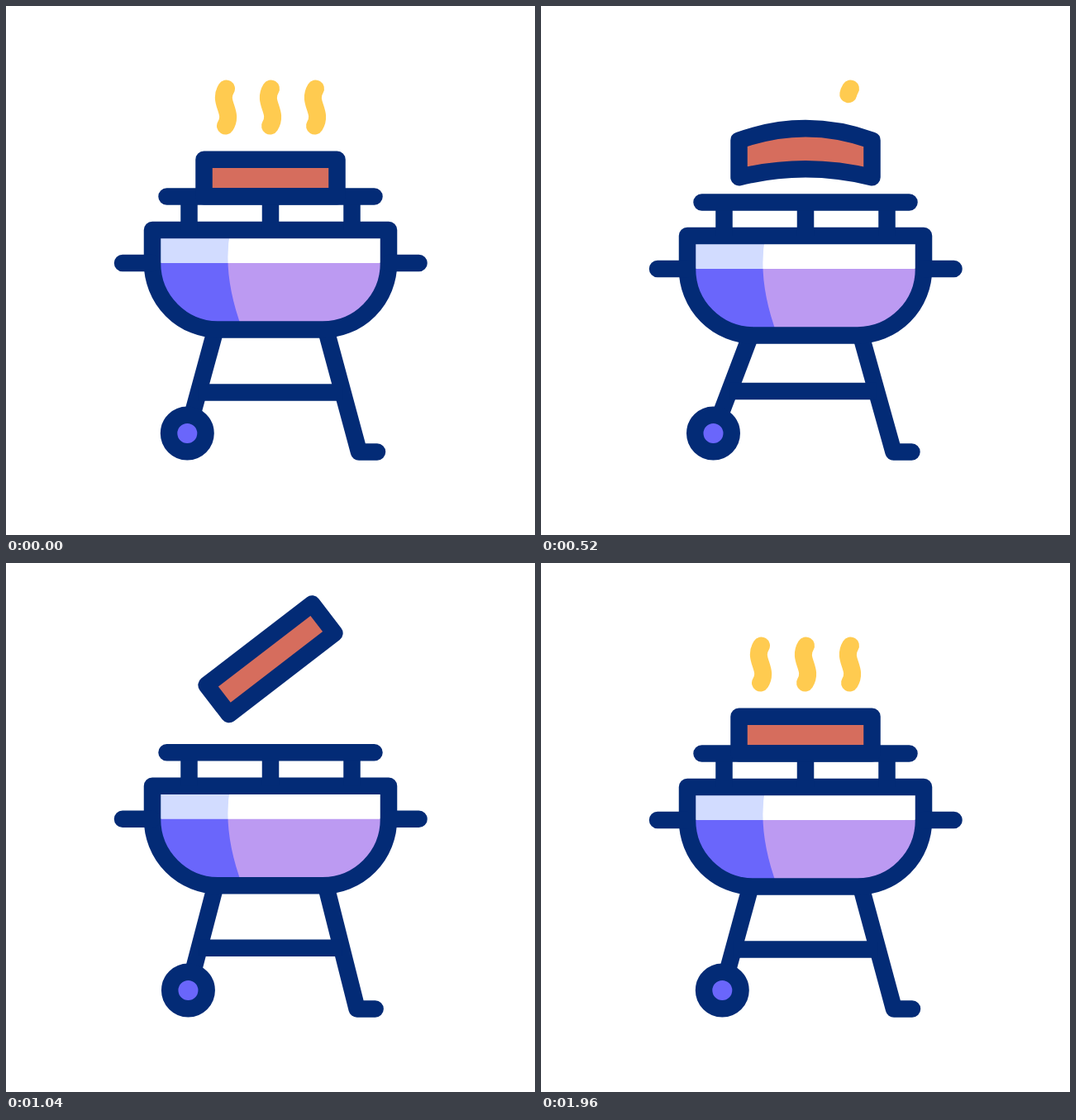
Recreate the animation shown at these times as an HTML page. Size 640 by 640 pixels, loop 2.16 s.

```html
<!DOCTYPE html>
<html lang="en">
<head>
<meta charset="utf-8">
<title>Grill</title>
<style>
  html, body { margin: 0; width: 100%; height: 100%; overflow: hidden; background: #fff; }
  svg { display: block; width: 100%; height: 100%; }
  .line { fill: none; stroke: #032b76; stroke-width: 20.5; stroke-linejoin: round; }
  .round { stroke-linecap: round; }
  #smoke { fill: none; stroke: #ffcb50; stroke-width: 21; stroke-linecap: round; }
</style>
</head>
<body>
<svg viewBox="0 0 640 640">
  <defs>
    <path id="bowl" d="M177 271H463V311A80 80.5 0 0 1 383 391.5H257A80 80.5 0 0 1 177 311Z"/>
    <clipPath id="inside"><use href="#bowl"/></clipPath>
  </defs>
  <g id="smoke"></g>
  <path id="legs" class="line round"/>
  <path id="bar" class="line"/>
  <circle id="wheel" class="line" cy="517" r="22.25" style="fill:#6a66fb"/>
  <g id="body">
    <g clip-path="url(#inside)">
      <path fill="#fff" d="M170 265H470V311H170Z"/>
      <path fill="#bc9af2" d="M170 311H470V400H170Z"/>
      <clipPath id="shade"><path d="M170 271H271.5Q261 325 286 391.5H170Z"/></clipPath>
      <g clip-path="url(#shade)">
        <path fill="#d2dcff" d="M170 265H300V311H170Z"/>
        <path fill="#6a66fb" d="M170 311H300V400H170Z"/>
      </g>
    </g>
    <use href="#bowl" class="line"/>
    <path class="line" d="M221.5 231V271M320 231V271M418.5 231V271"/>
    <path class="line round" d="M194.5 230.5H445.5M141 311H177M463 311H499.5"/>
  </g>
  <path id="meat" class="line" style="fill:#d66d5d"/>
</svg>
<script>
const $ = id => document.getElementById(id);
const set = (el, attrs) => { for (const k in attrs) el.setAttribute(k, attrs[k]); };
const part = (t, from, to) => Math.min(1, Math.max(0, (t - from) / (to - from)));
const smooth = u => u * u * (3 - 2 * u);
const mix = (a, b, u) => a + (b - a) * u;

// Eased value at t through [time, value] pairs
function keys(t, ...pairs) {
  let v = pairs[0][1];
  for (let i = 1; i < pairs.length; i++)
    v = mix(v, pairs[i][1], smooth(part(t, pairs[i - 1][0], pairs[i][0])));
  return v;
}

const wisps = [0, 1, 2].map(i => {
  const p = document.createElementNS("http://www.w3.org/2000/svg", "path");
  set(p, { d: "M266.5 100C256 117 276 128 265.5 145", pathLength: 1, transform: `translate(${54 * i})` });
  return $("smoke").appendChild(p);
});

function drawSmoke(t) {
  wisps.forEach((p, i) => {
    const gone = smooth(part(t, 60 + 110 * i, 380 + 110 * i));
    const grown = 1 - (1 - part(t, 1315 + 115 * i, 1755 + 115 * i)) ** 3;
    const size = t < 1000 ? 1 - gone : grown;
    set(p, {
      "stroke-dasharray": `${size} 3`,
      "stroke-dashoffset": t < 1000 ? 0 : size - 1,
      visibility: size > 0 ? "visible" : "hidden"
    });
  });
}

function drawStand(t, dy) {
  const top = 391.5 + dy;
  const wheelX = 219.3 + keys(t, [0, 0], [385, -16.8], [800, 7.3], [1120, 0]);
  const footX = 427 + keys(t, [0, 0], [320, 8.3], [800, -15.2], [1120, 0]);
  const barY = 467.5 + keys(t, [0, 0], [320, 4.7], [800, -11.5], [1120, 0]);
  const left = mix(253.5, wheelX, part(barY, top, 517));
  const right = mix(387, footX, part(barY, top, 539.5));
  set($("legs"), { d: `M253.5 ${top}L${wheelX} 517M387 ${top}L${footX} 539.5h22` });
  set($("legs"), { d: `M253.5 ${top}L${mix(253.5, wheelX, .8)} ${mix(top, 517, .8)}M387 ${top}L${footX} 539.5h22` });
  set($("bar"), { d: `M${left} ${barY}H${right}` });
  set($("wheel"), { cx: wheelX });
}

function drawMeat(t, dy) {
  let rise = -dy;
  if (t > 840) rise = 101.5 * (1 - part(t, 840, 1485) ** 2);
  else if (t > 455) rise = mix(-12, 101.5, 1 - (1 - part(t, 455, 840)) ** 2);
  const turn = 180 * smooth(part(t, 560, 1240));
  const bend = keys(t, [455, 0], [520, 14.5], [720, 0], [1160, 0], [1290, 8], [1480, 0]);
  const low = Math.min(bend, 10);
  set($("meat"), {
    d: `M-80.5 -22.3Q0 ${-22.3 - 2 * bend} 80.5 -22.3V22.3Q0 ${22.3 - 2 * low} -80.5 22.3Z`,
    transform: `translate(320 ${208 - rise}) rotate(${turn})`
  });
}

function frame(now) {
  const t = Math.floor(now % 2160 / 40) * 40;
  const dy = keys(t, [0, 0], [370, 12.6], [800, -7.8], [1120, 0]);
  set($("body"), { transform: `translate(0 ${dy})` });
  drawSmoke(t);
  drawStand(t, dy);
  drawMeat(t, dy);
  requestAnimationFrame(frame);
}
frame(0);
</script>
</body>
</html>
```
